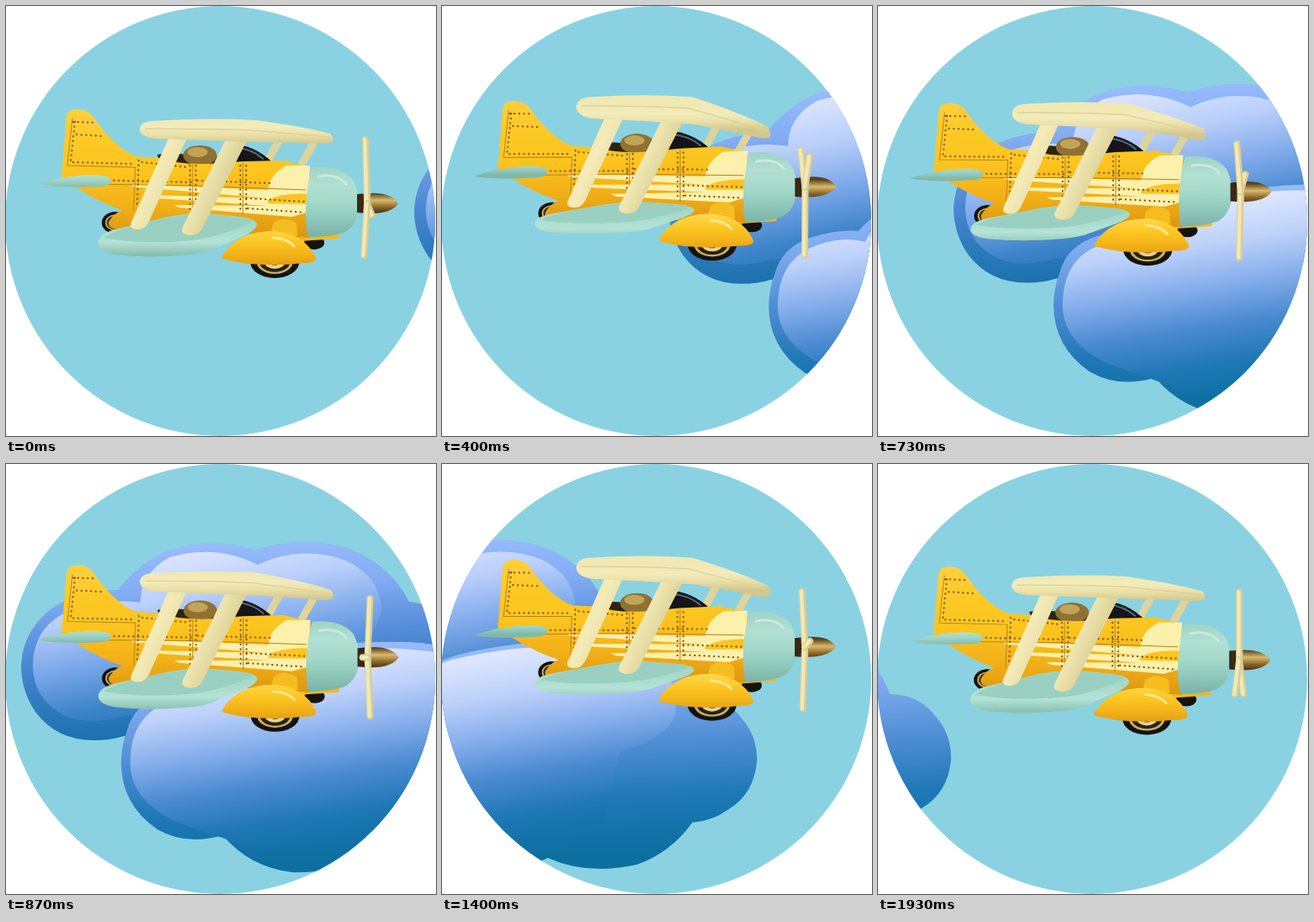
Write an HTML page with a canvas that moves like this. It is 512 by 512 pixels and loops after 2.07 s.

```html
<!DOCTYPE html>
<html lang="en">
<head>
<meta charset="utf-8">
<title>Toy biplane</title>
<style>
html, body { margin: 0; width: 100%; height: 100%; overflow: hidden; background: #fff; }
canvas { display: block; width: 512px; height: 512px; }
</style>
</head>
<body>
<canvas id="stage" width="512" height="512"></canvas>
<script>
const ctx = document.getElementById('stage').getContext('2d');
const LOOP = 2070;
let lift = 0;

function gradient(x0, y0, x1, y1, ...colors) {
  const g = ctx.createLinearGradient(x0, y0, x1, y1);
  colors.forEach((c, i) => g.addColorStop(i / (colors.length - 1), c));
  return g;
}

// How far each part of the plane tips, on top of the common lift.
const tilt = {
  body: x => 7 - (x - 80) * 0.03,
  topWing: (x, y) => -14 + Math.max(0, x - 290) * 0.2 + Math.max(0, y - 140) * 0.3,
  lowWing: (x, y) => 3 - (y - 246) * 0.29,
  strut: () => -11,
  wheel: () => -5
};

function shape(d, part) {
  return new Path2D(d.replace(/([\d.]+),([\d.]+)/g,
    (_, x, y) => x + ',' + (+y + tilt[part](+x, +y) * lift)));
}
function fill(part, color, d) {
  ctx.fillStyle = color;
  ctx.fill(shape(d, part));
}
function line(part, color, width, d, dash = []) {
  ctx.strokeStyle = color;
  ctx.lineWidth = width;
  ctx.setLineDash(dash);
  ctx.stroke(shape(d, part));
  ctx.setLineDash([]);
}
function oval(part, color, x, y, rx, ry) {
  ctx.fillStyle = color;
  ctx.beginPath();
  ctx.ellipse(x, y + tilt[part](x, y) * lift, rx, ry, 0, 0, 7);
  ctx.fill();
}
function wheel(part, x, y, rx, ry) {
  [['#15130e', 1], ['#c9b066', 0.74], ['#2a2213', 0.62], ['#e2d59a', 0.42], ['#8a6a24', 0.22]]
    .forEach(([c, k]) => oval(part, c, x, y, rx * k, ry * k));
}

const backCloud = new Path2D('M133,150Q156,120 192,103Q245,86 297,102Q350,85 400,98Q455,115 480,164Q520,168 540,200Q550,260 500,300L250,330L140,324Q125,329 105,329Q60,329 35,295Q18,270 18,240Q20,195 60,168Q95,150 133,150Z');
const backLight = new Path2D('M32,240Q32,200 65,180Q110,158 160,165Q160,130 195,111Q250,95 300,120Q350,96 405,115Q447,135 447,175Q440,200 420,230L300,290L140,300Q100,312 70,300Q32,280 32,240Z');
const frontCloud = new Path2D('M144,318Q152,285 190,273Q220,264 244,266Q270,235 330,224Q400,210 480,212Q550,215 576,250Q586,265 590,278Q625,278 645,305Q663,325 663,355Q660,395 628,414Q610,427 586,429Q560,465 520,479Q460,492 414,471Q380,488 340,486Q290,480 258,442Q215,455 180,435Q137,405 137,355Q138,332 144,318Z');
const frontLight = new Path2D('M148,360Q146,300 195,283Q225,272 252,279Q268,244 300,235Q370,218 440,219Q500,220 530,228Q570,250 566,300Q555,330 500,345L480,430L300,460L200,425Q150,400 148,360Z');

function clouds(step) {
  ctx.save();
  ctx.translate((13 - step) * 36, (13 - step) * 0.25);
  const layers = [
    [backCloud, gradient(200, 93, 215, 329, '#9abdfd', '#82acf2', '#568dd9', '#307cbf', '#1a70ac')],
    [backLight, gradient(220, 104, 262, 315, '#dde5ff', '#b8cefa', '#7ca8ea', '#3e84c9', '#1d71ae')],
    [frontCloud, gradient(400, 212, 415, 470, '#98bbfb', '#7faaee', '#4e8ed4', '#1f78b6', '#0d6fa0')],
    [frontLight, gradient(400, 222, 438, 460, '#dee6ff', '#bdd1fa', '#86afec', '#4a8ad0', '#1d77b4', '#0d6fa0')]
  ];
  for (const [path, color] of layers) {
    ctx.fillStyle = color;
    ctx.fill(path);
  }
  ctx.restore();
}

const spin = [[0, -20], [4, -135], [9, -240], [13, -330], [17, -450], [21, -515], [29, -720]];
function spinAt(step) {
  const k = Math.max(1, spin.findIndex(s => s[0] >= step));
  const [s0, a0] = spin[k - 1], [s1, a1] = spin[k];
  return a0 + (a1 - a0) * (step - s0) / (s1 - s0);
}

function propeller(step) {
  const y = 235 + tilt.body(430) * lift;
  fill('body', '#3a2817', 'M418,224L430,223L430,247L418,246Z');
  fill('body', gradient(0, 223, 0, 248, '#5a4120', '#d9bb6c', '#8a6528', '#3a2612'),
    'M434,223Q458,222 467,235Q460,247 434,247Z');
  for (let i = 0; i < 3; i++) {
    const a = (spinAt(step) + i * 120) * Math.PI / 180;
    const dx = 6 * Math.sin(a), dy = -81 * Math.cos(a);
    for (const [color, width, shift] of [['#d8cd94', 8, 0], ['#f1e8b4', 4.5, -0.8]]) {
      ctx.strokeStyle = color;
      ctx.lineWidth = width;
      ctx.beginPath();
      ctx.moveTo(430 + shift, y);
      ctx.lineTo(430 + shift + dx, y + dy);
      ctx.stroke();
    }
  }
}

function fuselage() {
  line('body', '#ddd49c', 9, 'M325,160L312,184M368,160L350,192');
  fill('body', '#15141b', 'M258,190L264,164Q295,164 318,187Z');
  line('body', '#8fb9b4', 2, 'M264,166L258,184');
  line('body', '#5d6670', 2, 'M272,168Q293,170 306,182');
  fill('body', '#2b2413', 'M180,177L192,175L260,180L258,192L184,188Z');
  oval('body', '#8f7133', 231, 178, 20, 12);
  oval('body', '#c3a356', 228, 174, 12, 6);

  wheel('body', 130, 258, 16, 13);
  oval('wheel', '#15130e', 367, 282, 12, 8);
  fill('wheel', '#f2b91c', 'M345,270L390,270Q400,272 395,277L350,280Z');

  fill('body', gradient(0, 123, 0, 276, '#ffd040', '#fdc925', '#fcc41e', '#f2b018', '#dc9611'),
    'M66,204L72,131Q74,122 86,123Q97,123 104,132Q128,168 155,179L184,181Q205,189 240,188L282,185L330,184L362,192L362,276L300,272L170,262L142,266Q121,268 122,257Q128,247 138,243Q105,232 66,204Z');

  // Cream speed stripes.
  fill('body', '#fbf0ac', 'M362,190L334,190Q314,200 312,219L150,212L150,215L312,229L170,225L180,229L312,238L200,237L206,240L340,251L358,246Z');
  fill('body', '#fdc41f', 'M362,224Q330,222 312,231L312,235L358,236Z');

  line('body', '#b8841a', 1, 'M79,134L73,190L154,192L152,243M222,189L222,246M282,187L282,248M100,212L222,214L357,219');
  line('body', '#80591a', 2.2, 'M80,138L108,139M82,138L77,186L150,188M158,184L156,240M100,207L220,210M219,190L219,244M226,190L226,244M286,190L286,246M279,190L279,246M228,208L314,211M286,229L356,233M288,241L356,246M84,153L116,155M162,186L216,192', [0.3, 5.4]);

  fill('body', gradient(0, 192, 0, 275, '#a0d4c6', '#b2e0d2', '#a5d9ca', '#8fc8ba', '#79b3a6'),
    'M364,192Q399,189 413,207Q421,222 420,240Q418,262 402,270Q380,276 359,275Q353,235 364,192Z');
  line('body', '#c9eadf', 3, 'M372,203Q394,199 405,212');

  fill('body', gradient(0, 200, 0, 217, '#b6e3d6', '#9fd4c5', '#7fb9ab'),
    'M38,212Q60,203 100,201Q124,201 125,208Q124,216 105,215Q70,217 38,212Z');
}

function wings() {
  fill('lowWing', gradient(0, 247, 0, 298, '#9ed4c5', '#a6dacb', '#b4e3d6', '#84bcae'),
    'M110,284Q108,272 130,266L180,254Q210,246 240,247L280,251Q298,254 299,260Q298,267 284,273L244,291Q232,295 218,296Q170,301 130,296Q112,293 110,284Z');
  fill('lowWing', '#9ad0c1',
    'M116,276Q130,266 180,255Q210,248 240,248L280,252Q296,255 290,259Q250,276 222,279Q160,285 116,276Z');

  const strutColor = gradient(180, 200, 250, 232, '#f3eab6', '#e6dca4', '#f1e8b4', '#dfd59b');
  fill('strut', strutColor, 'M194,156L216,156L170,257Q165,267 156,266Q146,265 149,258Z');
  fill('strut', strutColor, 'M263,156L289,156L233,266Q229,273 219,273Q207,272 210,264Z');

  const wheelYellow = gradient(0, 266, 0, 308, '#ffd64a', '#fcc722', '#f5b51a', '#e3a014');
  wheel('wheel', 320, 305, 29, 19);
  fill('wheel', '#f6bd20', 'M318,259Q330,249 346,259L347,274L314,274Z');
  fill('wheel', wheelYellow, 'M257,298Q275,268 318,268Q355,270 369,300Q369,306 355,306Q300,312 262,302Q256,301 257,298Z');
  line('wheel', '#ffe68c', 3, 'M318,276Q335,277 343,286');

  fill('topWing', gradient(0, 135, 0, 164, '#f1e8b4', '#f3ebba', '#e9dfa6', '#d2c78d'),
    'M159,147Q160,137 178,137Q240,133 296,136Q350,143 386,152Q391,157 388,162Q380,165 360,163L300,162Q240,160 178,158Q160,156 159,147Z');
  line('topWing', '#ddd39b', 1.5, 'M166,146Q240,146 292,148Q340,152 386,156');
}

function draw(now) {
  const t = now % LOOP;
  const step = Math.min(29, Math.floor((Math.floor(t / 10) * 10 + 3.4) * 0.015));
  lift = (step < 15 ? 1.04 : 0.92) * (1 - Math.cos((step - 0.3) * Math.PI / 7.5)) / 2;

  ctx.clearRect(0, 0, 512, 512);
  ctx.save();
  ctx.beginPath();
  ctx.arc(255, 256, 256, 0, 7);
  ctx.clip();
  ctx.fillStyle = '#8ad2e2';
  ctx.fillRect(0, 0, 512, 512);
  clouds(step);
  ctx.lineCap = 'round';
  ctx.translate(0, -18 * lift);
  ctx.scale(1 + 0.006 * lift, 1);
  fuselage();
  wings();
  propeller(step);
  ctx.restore();
  requestAnimationFrame(tick);
}

const start = performance.now();
function tick() {
  draw(performance.now() - start);
}
tick();
</script>
</body>
</html>
```
